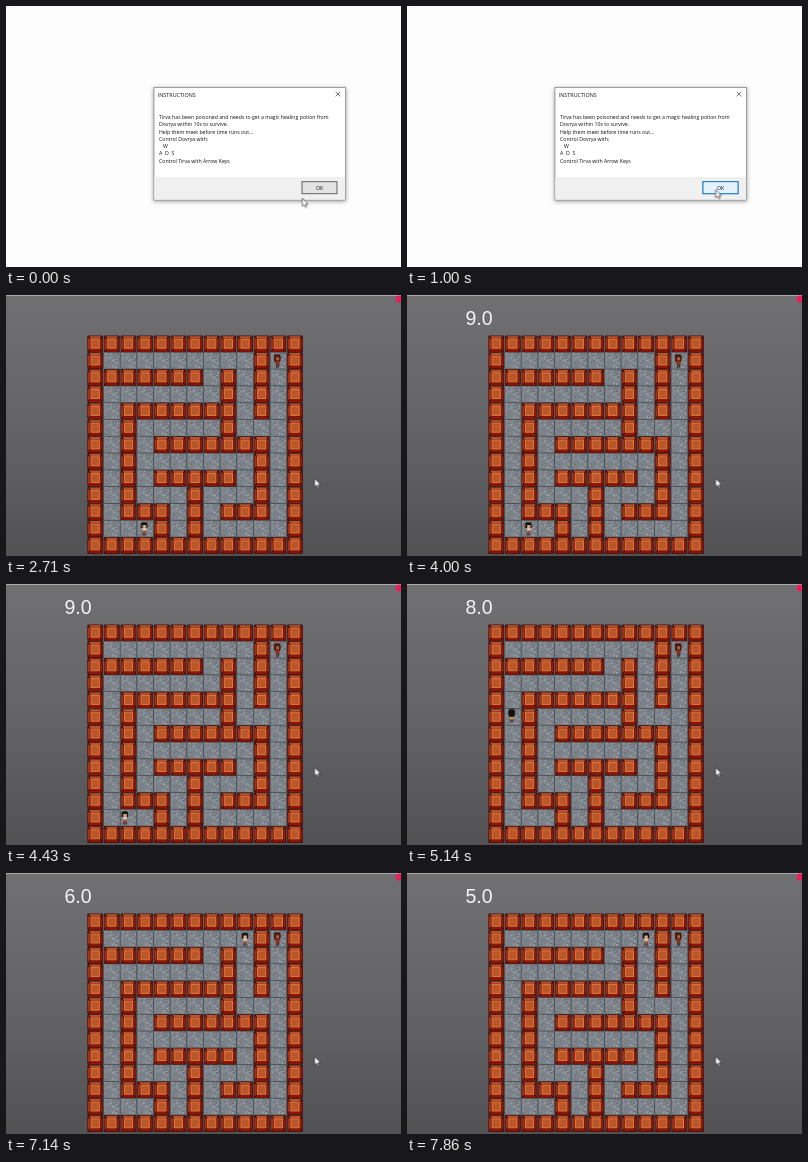
Write an HTML page that moves like this. It is 395 px wide and 261 px high and loops after 8000 ms.

```html
<!DOCTYPE html>
<html lang="en">
<head>
<meta charset="utf-8">
<title>Maze rescue</title>
<style>
html, body { margin: 0; width: 100%; height: 100%; overflow: hidden; background: #fdfdfe; }
svg { display: block; width: 100vw; height: 100vh; }

.dialog text { font-family: "Open Sans", "Noto Sans", sans-serif; font-size: 5.18px; fill: #111; white-space: pre; }
.dialog .title { font-size: 5.4px; }
.dialog .panel { filter: drop-shadow(0 1px 2px rgba(0, 0, 0, .4)); }
.timer text { font: 19.5px "Liberation Sans", Arial, sans-serif; fill: #f4f4f4; opacity: 0; }

.dialog, .hover, .cursor, .game, .timer text, .player, .front, .back { animation: 8s linear infinite; }
.dialog { animation-name: close; transform-origin: 243.5px 137.5px; }
.hover { animation-name: hover; }
.cursor { animation-name: point; }
.game { animation-name: start; animation-timing-function: step-end; }
.timer text { animation-name: tick; animation-timing-function: step-end; }
.player { animation-name: walk; }
.front { animation-name: front; animation-timing-function: step-end; }
.back { animation-name: back; animation-timing-function: step-end; }

@keyframes close {
  0%, 12.8% { opacity: 1; transform: none; }
  15.5%, 100% { opacity: 0; transform: scale(.94); }
}
@keyframes hover { 0%, 7% { opacity: 0; } 8.5%, 100% { opacity: 1; } }
@keyframes point {
  0%, 4.5% { transform: translate(296.3px, 192.2px); }
  10.7%, 100% { transform: translate(308.6px, 183.6px); }
}
@keyframes start { 0% { opacity: 0; } 33.8%, 100% { opacity: 1; } }
@keyframes tick { 0% { opacity: 1; } 12.5%, 100% { opacity: 0; } }
@keyframes walk {
  0%, 46.3% { transform: translate(138.3px, 234px); }
  48%, 55% { transform: translate(121.5px, 234px); }
  57.5% { transform: translate(104.7px, 234px); }
  64.25% { transform: translate(104.7px, 132px); }
  66.4% { transform: translate(104.7px, 98.7px); }
  75%, 82.5% { transform: translate(205.5px, 98.7px); }
  84.6% { transform: translate(205.5px, 66.5px); }
  87.5%, 100% { transform: translate(239px, 66.5px); }
}
@keyframes front { 0% { opacity: 1; } 57.5% { opacity: 0; } 66.4% { opacity: 1; } 82.5% { opacity: 0; } 84.6%, 100% { opacity: 1; } }
@keyframes back { 0% { opacity: 0; } 57.5% { opacity: 1; } 66.4% { opacity: 0; } 82.5% { opacity: 1; } 84.6%, 100% { opacity: 0; } }
</style>
</head>
<body>
<svg viewBox="0 0 395 261" preserveAspectRatio="none">
  <defs>
    <linearGradient id="wall" x1="0" y1="0" x2="0" y2="1">
      <stop offset="0" stop-color="#706f72"/>
      <stop offset=".5" stop-color="#646366"/>
      <stop offset="1" stop-color="#525254"/>
    </linearGradient>
    <g id="brick">
      <rect x=".4" width="15.85" height="16.8" rx="1" fill="#3d1512"/>
      <path d="M2.4 .7H14.2L12.8 3.2H3.8z" fill="#b9522c"/>
      <path d="M3.8 13.4H12.8L15 16.2H1.6z" fill="#8e1408"/>
      <path d="M1 2L3.4 3.8V12.8L1 15z" fill="#a03018"/>
      <path d="M15.6 2L13.2 3.8V12.8L15.6 15z" fill="#8a1a0c"/>
      <rect x="3.3" y="3" width="10" height="10.4" fill="#6a1a0e"/>
      <rect x="4.2" y="3.7" width="8.2" height="9" fill="#b9562a" stroke="#e67a3a" stroke-width="1"/>
    </g>
    <g id="floor"></g>
  </defs>

  <rect width="395" height="261" fill="#fdfdfe"/>

  <g class="dialog">
    <rect class="panel" x="148" y="81.5" width="191.5" height="112.5" fill="#fff" stroke="#8c8c8c" stroke-width=".8"/>
    <rect x="148.4" y="171" width="190.7" height="22.6" fill="#f0f0f0"/>
    <text class="title" x="151.8" y="90.5">INSTRUCTIONS</text>
    <path d="M329.6 85.8l4.6 4.6m0-4.6l-4.6 4.6" stroke="#333" stroke-width=".7"/>
    <g id="lines"></g>
    <rect x="296" y="175.7" width="35" height="12" fill="#e3e3e3" stroke="#555" stroke-width=".9"/>
    <rect class="hover" x="296" y="175.7" width="35" height="12" fill="#e5f1fb" stroke="#0078d7" stroke-width=".9"/>
    <text x="313.5" y="183.7" text-anchor="middle">OK</text>
  </g>

  <g class="game">
    <rect width="395" height="261" fill="url(#wall)"/>
    <rect width="395" height=".7" fill="#c4c4c6"/>
    <circle cx="393" cy="4" r="3.4" fill="#e8205a"/>
    <g id="maze"></g>
    <g transform="translate(271.5 66.3)">
      <path d="M-3-7H2L3.2-5V-1L2 1H-2.4L-3.6-1V-5z" fill="#4a1c10"/>
      <rect x="-1.4" y="-4" width="3" height="3" fill="#a86446"/>
      <path d="M-1.6-.4H1.8L2.2 3.8H-1.8z" fill="#8e2c1e"/>
      <path d="M-1.2 3.8h1.1v3.2h-1.1zM.7 3.8h1.1v2.4H.7z" fill="#2c1210"/>
    </g>
    <g class="player">
      <path d="M-2.4-6.8H2.2L3.2-5V-1H-3.4V-5z" fill="#15100f"/>
      <g class="front">
        <rect x="-1.6" y="-4" width="3.4" height="3.2" fill="#dba882"/>
        <path d="M-1.6-.8H1.6L2.2 3.4H-2z" fill="#e6d6c6"/>
        <path d="M-1.8 1.4H1.8L2.2 3.4H-2z" fill="#a8452c"/>
      </g>
      <g class="back">
        <rect x="-2.8" y="-3" width="5.6" height="4" fill="#15100f"/>
        <rect x="-2" y="1" width="4" height="2.6" fill="#c99a48"/>
      </g>
      <path d="M-1.6 3.4h1.2v3h-1.2zM.6 3.4h1.2v3H.6z" fill="#3a1a14"/>
    </g>
    <g class="timer" id="timer"></g>
  </g>

  <g class="cursor">
    <path d="M0 0V8.2L1.9 6.5L3.2 9.2L4.5 8.6L3.3 6H5.9z" fill="#fff" stroke="#222" stroke-width=".6"/>
  </g>
</svg>
<script>
const CELL_W = 16.65, CELL_H = 16.8, LEFT = 80.9, TOP = 40.5;
const maze = [
  "#############",
  "#.........#.#",
  "#######.#.#.#",
  "#.......#.#.#",
  "#.#######.#.#",
  "#.#.....#...#",
  "#.#.#######.#",
  "#.#.......#.#",
  "#.#.#####.#.#",
  "#.#...#...#.#",
  "#.###.#.###.#",
  "#...#.#.....#",
  "#############"
];
const message = [
  "Tirva has been poisoned and needs to get a magic healing potion from",
  "Dovrya within 10s to survive.",
  "Help them meet before time runs out...",
  "Control Dovrya with:",
  "   W",
  "A  D  S",
  "Control Tirva with Arrow Keys"
];

function add(parent, tag, attrs, text = "") {
  const el = document.createElementNS("http://www.w3.org/2000/svg", tag);
  for (const key in attrs) el.setAttribute(key, attrs[key]);
  el.textContent = text;
  document.getElementById(parent).append(el);
  return el;
}

let seed = 7;
const random = () => (seed = seed * 16807 % 2147483647) / 2147483647;

// One speckled stone tile, shared by every open cell
add("floor", "rect", { width: CELL_W, height: CELL_H, fill: "#42464b" });
add("floor", "rect", { x: .4, y: .4, width: CELL_W - .8, height: CELL_H - .8, fill: "#7d838a" });
for (let i = 0; i < 60; i++) {
  add("floor", "rect", {
    x: .5 + random() * 13.6, y: .5 + random() * 14.4,
    width: 1 + random(), height: .8 + random() * .5,
    fill: ["#666c73", "#91979d", "#a1a6ab", "#737980"][i % 4]
  });
}

maze.forEach((row, r) => [...row].forEach((cell, c) =>
  add("maze", "use", {
    href: cell === "#" ? "#brick" : "#floor",
    x: LEFT + c * CELL_W, y: TOP + r * CELL_H
  })));

message.forEach((line, i) => add("lines", "text", { x: 153, y: 113.2 + i * 7.22 }, line));

// Countdown: each value shows for one second of the loop
for (let n = 1; n <= 5; n++) {
  add("timer", "text", { x: 58.5, y: 29.7 }, (10 - n).toFixed(1))
    .style.animationDelay = `${2710 + n * 1000 - 8000}ms`;
}
</script>
</body>
</html>
```
